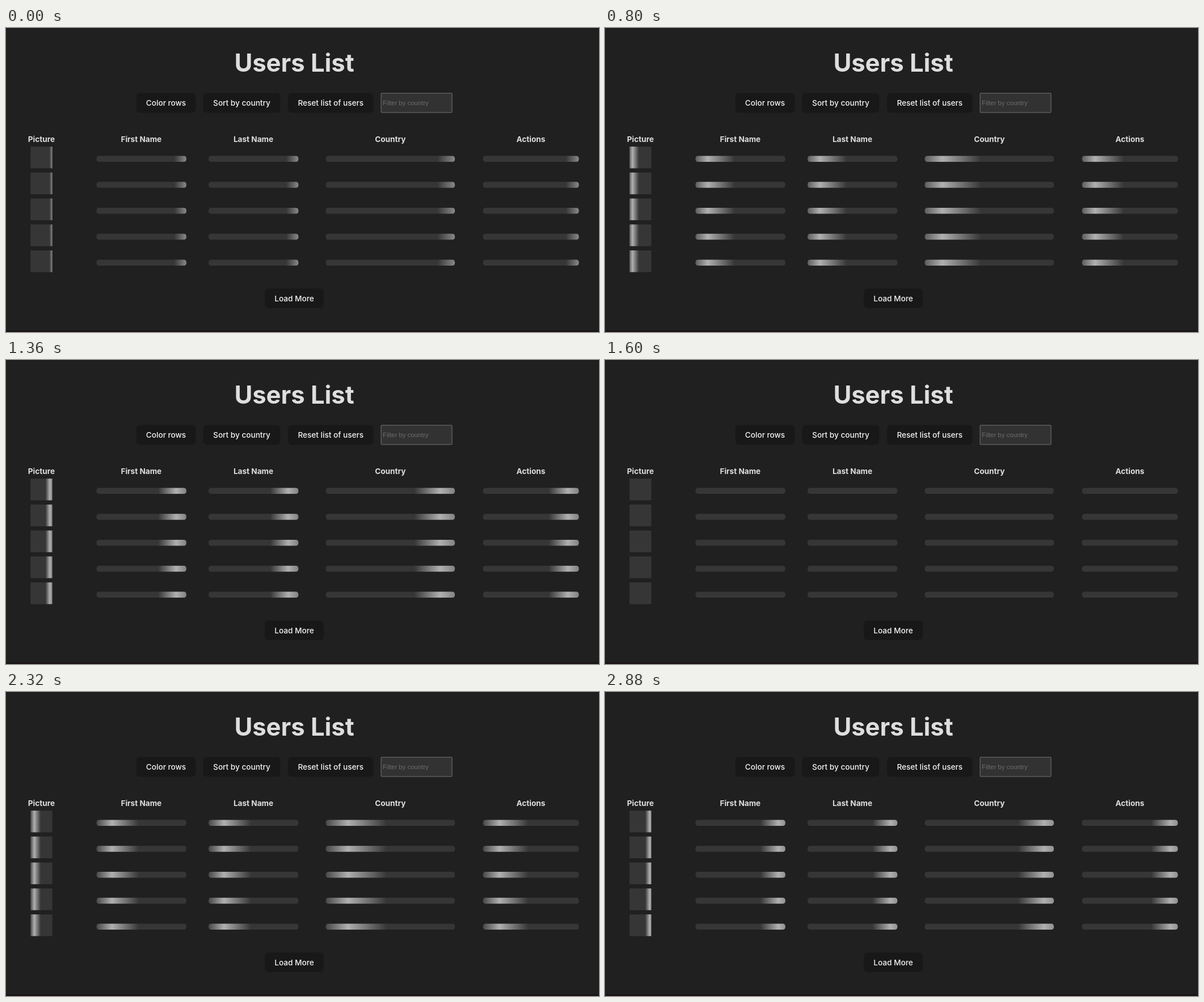
Animation of 1045x536 px, one loop 2960 ms. Source, as an HTML page:

```html
<!DOCTYPE html>
<html lang="en">
<head>
<meta charset="utf-8">
<title>Users List</title>
<style>
  html, body { margin: 0; width: 100%; height: 100%; overflow: hidden; background: #202020; }
  svg { display: block; width: 1045px; height: 536px; }
  text { font: 500 13.6px Inter, sans-serif; font-optical-sizing: none; text-anchor: middle; fill: #f4f4f4; }
  .title { font-size: 43.5px; font-weight: 700; fill: #dedede; }
  .head { font-weight: 700; fill: #dedede; }
  .hint { font: 400 11.35px "Liberation Sans", Arial, sans-serif; text-anchor: start; fill: #6d6d6d; }
</style>
</head>
<body>
<svg id="stage" viewBox="0 0 1045 536" xmlns="http://www.w3.org/2000/svg">
  <defs>
    <linearGradient id="shine" x1="1" x2="2" y1="0" y2="0">
      <stop offset=".3" stop-color="#363636"/>
      <stop offset=".5" stop-color="#b0b0b0"/>
      <stop offset=".8" stop-color="#363636"/>
    </linearGradient>
  </defs>
  <rect width="1045" height="536" fill="#202020"/>
  <rect width="1045" height="1" fill="#1b1b1b"/>
  <rect x="1044" width="1" height="536" fill="#1a1a1a"/>
  <rect y="533" width="1045" height="3" fill="#1a1517"/>
</svg>
<script>
const LOOP = 2960, STEP = 80, SWEEP = 1493;
const stage = document.getElementById('stage');
const shine = document.getElementById('shine');

function add(name, attrs, content = '') {
  const el = document.createElementNS('http://www.w3.org/2000/svg', name);
  for (const key in attrs) el.setAttribute(key, attrs[key]);
  el.textContent = content;
  stage.append(el);
}

const box = (x, y, width, height, rx, fill) => add('rect', { x, y, width, height, rx, fill });
const label = (x, y, content, cls = '') => add('text', { x, y, class: cls }, content);

function button(x, y, width, content) {
  box(x, y, width, 34.8, 6.8, '#181818');
  label(x + width / 2, y + 22.4, content);
}

label(508, 77, 'Users List', 'title');
button(229.8, 114.6, 104.4, 'Color rows');
button(347.4, 114.6, 136.1, 'Sort by country');
button(496.9, 114.6, 150.6, 'Reset list of users');
button(456, 459.3, 104, 'Load More');

add('rect', { x: 661, y: 115, width: 125, height: 34, rx: 1, fill: '#323232', stroke: '#757575' });
label(664, 136, 'Filter by country', 'hint');

// heading, its centre, and the bar's left edge and width
const columns = [
  ['First Name', 238.3, 159.5, 158.3],
  ['Last Name', 436, 357, 158.3],
  ['Country', 677.3, 563.5, 227.5],
  ['Actions', 925, 840.6, 168.9]
];
label(62.4, 201, 'Picture', 'head');
for (const [name, center] of columns) label(center, 201, name, 'head');
for (let row = 0; row < 5; row++) {
  const y = row * 45.75;
  box(43.2, 209.1 + y, 38.4, 38.3, 0, 'url(#shine)');
  for (const [, , x, width] of columns) box(x, 225.6 + y, width, 10.4, 4.3, 'url(#shine)');
}

function draw(ms) {
  const t = Math.floor((ms % LOOP) / STEP) * STEP;
  // the band slides from one width left of each shape to one width right
  let shift = (1.564 + 2 * t / SWEEP) % 2 - 1;
  // thin slivers at either end stay hidden
  if (shift < -0.75 || shift > 0.665) shift = 1;
  shine.setAttribute('x1', shift);
  shine.setAttribute('x2', shift + 1);
}

const start = performance.now();
function tick() {
  draw(performance.now() - start);
  requestAnimationFrame(tick);
}
tick();
</script>
</body>
</html>
```
